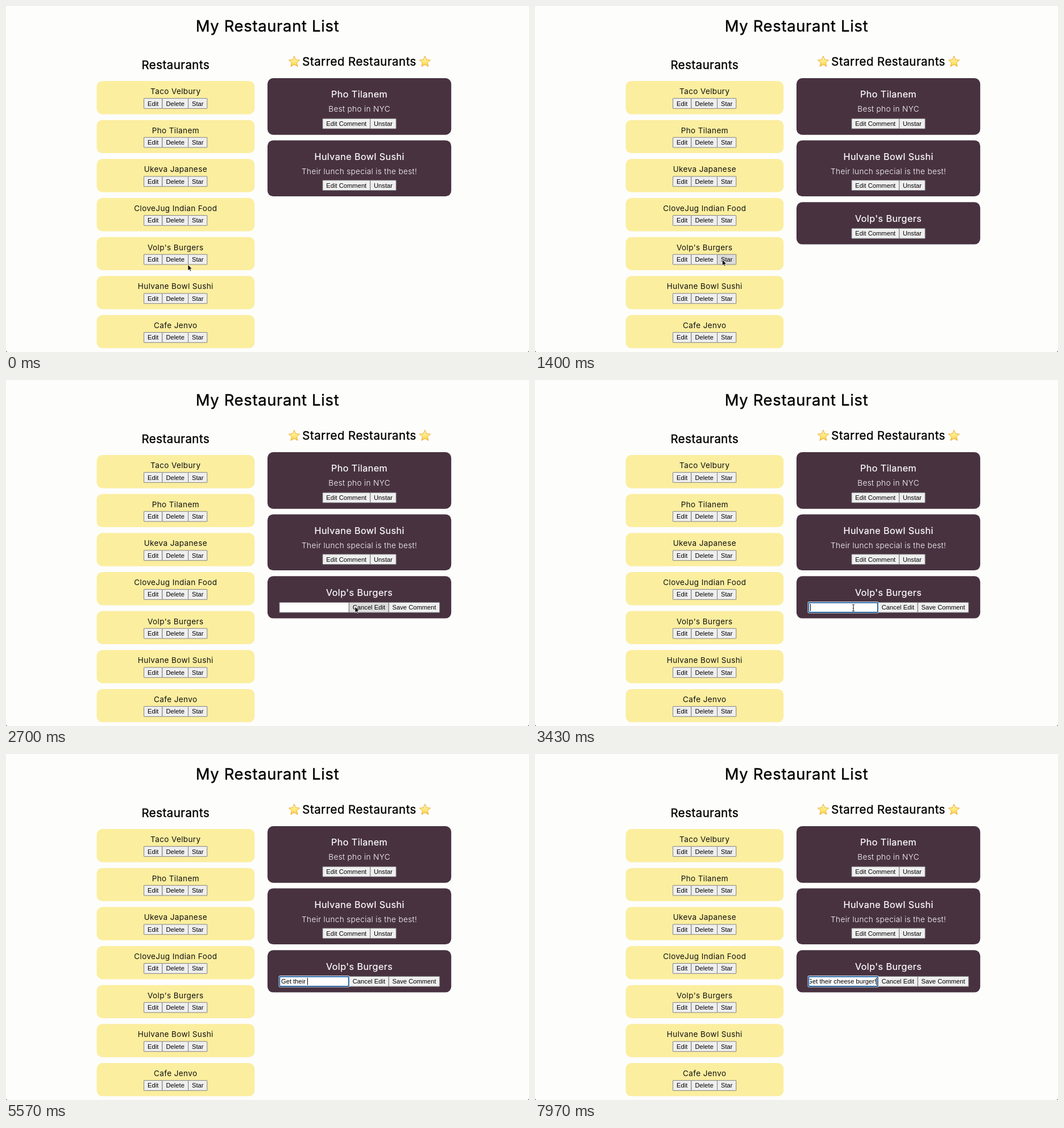
Recreate the animation shown at these times as an HTML page. Size 920 px wide and 609 px high, loop 8 s.

```html
<!DOCTYPE html>
<html lang="en">
<head>
<meta charset="utf-8">
<title>My Restaurant List</title>
<style>
  html, body { margin: 0; width: 100%; height: 100%; overflow: hidden; background: #fdfdfc; }
  svg { display: block; width: 920px; height: 609px; }
  text { font-family: Inter, "Open Sans", sans-serif; font-optical-sizing: none; letter-spacing: .025em; white-space: pre; }
  .mid { text-anchor: middle; }
  .bold { stroke: #000; stroke-width: .4px; }
  .title { font-size: 27.4px; }
  .head { font-size: 20.4px; }
  .name { font-size: 13.6px; fill: #111; }
  .starred { font-size: 16.2px; fill: #fff; stroke: #fff; stroke-width: .2px; }
  .comment { font-size: 13.6px; font-weight: 300; fill: #fff; }
  .ui { font-family: "Liberation Sans", Arial, sans-serif; font-size: 11.2px; letter-spacing: 0; fill: #000; }
  .card { fill: #483240; }
  .row { fill: #fbee9f; }
  .btn { fill: #efefef; stroke: #767676; stroke-width: .9px; }
  .btn.hover { fill: #dcdcdc; }
</style>
</head>
<body>
<svg viewBox="0 0 920 609" xmlns="http://www.w3.org/2000/svg">
  <defs>
    <linearGradient id="gold" x1="0" y1="0" x2="0" y2="1">
      <stop offset="0" stop-color="#fff6b0"/>
      <stop offset=".6" stop-color="#fee873"/>
      <stop offset="1" stop-color="#fbc63c"/>
    </linearGradient>
    <clipPath id="field"><rect x="483" y="391" width="118.5" height="18"/></clipPath>
  </defs>
  <rect width="920" height="609" fill="#fdfdfc"/>
  <path d="M0 606.5V609H2.5Q.5 608.5 0 606.5M920 606.5V609H917.5Q919.5 608.5 920 606.5" fill="#555"/>
  <g id="page"></g>
  <g id="newCard"></g>
  <g id="viewMode"></g>
  <g id="editMode"></g>
  <path id="arrow" d="M0 0V10.4L2.4 8.2L4 11.6L5.6 10.9L4.1 7.5H7.3Z" fill="#000" stroke="#fff" stroke-width=".7"/>
  <path id="beam" d="M-2-6Q0-6 0-4.5Q0-6 2-6M0-4.5V4.5M-2 6Q0 6 0 4.5Q0 6 2 6M-1 .8H1" fill="none" stroke="#000" stroke-width=".9"/>
</svg>
<script>
const LOOP = 8000;
const STAR_CLICK = 1200, EDIT_CLICK = 2400, FOCUS = 3350, TYPE_START = 3960;
const KEY_MS = 152, HOVER_LAG = 70;
const MESSAGE = 'Get their cheese burger!';
const LEFT = 298.3, RIGHT = 621.6;
const NAMES = ['Taco Velbury', 'Pho Tilanem', 'Ukeva Japanese', 'CloveJug Indian Food',
  "Volp's Burgers", 'Hulvane Bowl Sushi', 'Cafe Jenvo'];

// Pointer stops: time, x, y
const STOPS = [[630, 320, 455.3], [770, 329.5, 446.5], [1400, 329.5, 446.5], [1780, 660, 402],
  [1890, 650, 399], [1970, 631.5, 398], [2200, 614, 399], [2800, 614, 399], [3200, 560, 401]];

const $ = id => document.getElementById(id);
const buttons = [];

function add(parent, tag, attrs, content = '') {
  const el = document.createElementNS('http://www.w3.org/2000/svg', tag);
  for (const key in attrs) el.setAttribute(key, attrs[key]);
  el.textContent = content;
  return parent.appendChild(el);
}

const label = (parent, x, y, cls, str) => add(parent, 'text', { x, y, class: 'mid ' + cls }, str);

const box = (parent, x, y, width, height, cls) =>
  add(parent, 'rect', { x, y, width, height, rx: 10, class: cls });

function button(parent, x, y, w, str) {
  const el = add(parent, 'rect', { x, y, width: w, height: 17.8, rx: .5, class: 'btn' });
  label(parent, x + w / 2, y + 12.9, 'ui', str);
  buttons.push({ el, x, y, w });
}

function commentButtons(parent, y) {
  button(parent, 557, y, 83.6, 'Edit Comment');
  button(parent, 640.8, y, 45.4, 'Unstar');
}

function star(parent, cx, cy) {
  let d = '';
  for (let i = 0; i < 10; i++) {
    const r = i % 2 ? 4.7 : 10.2, a = i * Math.PI / 5;
    d += `${i ? 'L' : 'M'}${cx + r * Math.sin(a)} ${cy - r * Math.cos(a)}`;
  }
  add(parent, 'path', { d: d + 'Z', fill: 'url(#gold)', stroke: '#eeac3c',
    'stroke-width': 1, 'stroke-linejoin': 'round' });
}

function starredCard(parent, y, h, name, comment) {
  box(parent, 460, y, 323.2, h, 'card');
  label(parent, RIGHT, y + 34.4, 'starred', name);
  if (comment) label(parent, RIGHT, y + 59.2, 'comment', comment);
}

const page = $('page');
label(page, 460, 44.6, 'title bold', 'My Restaurant List');
label(page, LEFT, 111, 'head bold', 'Restaurants');
label(page, RIGHT, 105, 'head bold', 'Starred Restaurants');
star(page, 507, 98.3);
star(page, 737, 98.3);

NAMES.forEach((name, i) => {
  const y = 132 + i * 68.66;
  box(page, 159.5, y, 277.8, 58.4, 'row');
  label(page, LEFT, y + 23, 'name', name);
  button(page, 242.6, y + 30.6, 32.2, 'Edit');
  button(page, 274.9, y + 30.6, 45.6, 'Delete');
  button(page, 320.6, y + 30.6, 33.2, 'Star');
});

starredCard(page, 127, 99.7, NAMES[1], 'Best pho in NYC');
commentButtons(page, 198.2);
starredCard(page, 236.4, 98.7, NAMES[5], 'Their lunch special is the best!');
commentButtons(page, 306.8);

starredCard($('newCard'), 345.2, 74.4, NAMES[4]);
commentButtons($('viewMode'), 391.4);

const edit = $('editMode');
button(edit, 603.6, 391.4, 69.6, 'Cancel Edit');
button(edit, 673.4, 391.4, 89.4, 'Save Comment');
add(edit, 'rect', { x: 481, y: 391.4, width: 122.2, height: 17.8, fill: '#fff', stroke: '#767676', 'stroke-width': .9 });
const ring = add(edit, 'g', {});
add(ring, 'rect', { x: 480.2, y: 390.6, width: 123.8, height: 19.4, rx: 1.5, fill: 'none', stroke: '#fff' });
add(ring, 'rect', { x: 481.4, y: 391.8, width: 121.4, height: 17, rx: 1, fill: '#fff', stroke: '#155a9c', 'stroke-width': 1.7 });
const field = add(edit, 'g', { 'clip-path': 'url(#field)' });
const typed = add(field, 'text', { y: 404.3, class: 'ui' });
const caret = add(field, 'rect', { y: 394, width: 1, height: 12.6 });

function pointer(t) {
  let a = STOPS[0];
  for (const b of STOPS) {
    if (t < b[0]) {
      const k = Math.max(0, (t - a[0]) / (b[0] - a[0] || 1));
      const e = k * k * (3 - 2 * k);
      return [a[1] + (b[1] - a[1]) * e, a[2] + (b[2] - a[2]) * e];
    }
    a = b;
  }
  return [a[1], a[2]];
}

const show = (el, on) => el.setAttribute('display', on ? 'inline' : 'none');

function render(t) {
  const editing = t >= EDIT_CLICK, focused = t >= FOCUS;
  show($('newCard'), t >= STAR_CLICK);
  show($('viewMode'), t >= STAR_CLICK && !editing);
  show(edit, editing);
  show(ring, focused);

  const [hx, hy] = pointer(t - HOVER_LAG);
  for (const b of buttons) {
    const over = hx >= b.x && hx < b.x + b.w && hy >= b.y && hy < b.y + 17.8;
    b.el.classList.toggle('hover', over);
  }

  const count = Math.max(0, Math.min(MESSAGE.length, Math.floor((t - TYPE_START) / KEY_MS)));
  typed.textContent = MESSAGE.slice(0, count);
  if (editing) {
    const w = count ? typed.getComputedTextLength() : 0;
    const x = Math.min(484, 600 - w);
    typed.setAttribute('x', x);
    caret.setAttribute('x', x + w);
  }
  const typing = count > 0;
  show(caret, focused && (typing || (t - FOCUS) % 1000 < 500));

  const [x, y] = pointer(t);
  const overField = editing && x > 481 && x < 603;
  show($('arrow'), !typing && !overField);
  show($('beam'), !typing && overField);
  for (const id of ['arrow', 'beam']) $(id).setAttribute('transform', `translate(${x} ${y})`);
}

const start = performance.now();
function tick() {
  render((performance.now() - start) % LOOP);
  requestAnimationFrame(tick);
}
tick();
</script>
</body>
</html>
```
